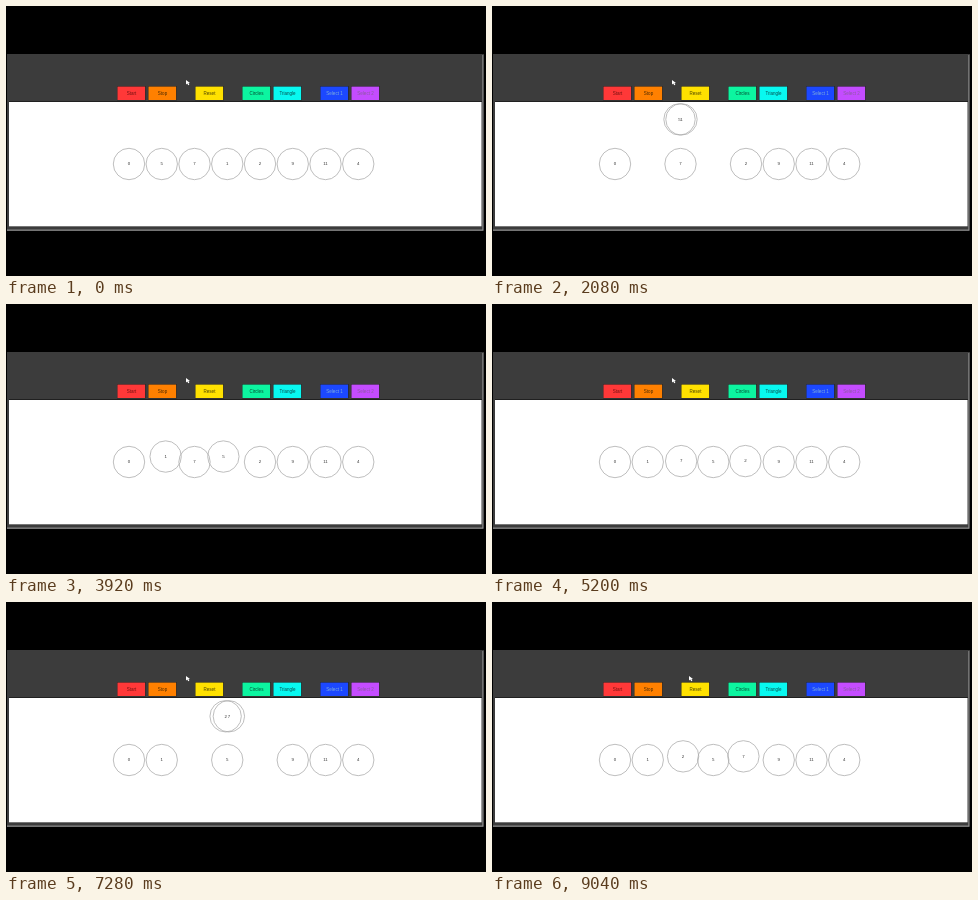
These frames come from a looping animation (480x270 px, 9120 ms). An HTML page with a canvas:

```html
<!DOCTYPE html>
<html lang="en">
<head>
<meta charset="utf-8">
<title>Selection sort</title>
<style>
  html, body { margin: 0; width: 100%; height: 100%; overflow: hidden; background: #000; }
  canvas { display: block; width: 480px; height: 270px; }
</style>
</head>
<body>
<canvas id="stage" width="480" height="270"></canvas>
<script>
const ctx = document.getElementById('stage').getContext('2d');

const LOOP = 9120, STEP = 80;
const LEG = 2020;              // time for one side of the triangle
const ROW = 158, APEX = 112, RADIUS = 15.7;
const values = [0, 5, 7, 1, 2, 9, 11, 4];
const swaps = [
  { a: 1, b: 3, start: 120, shown: 240 },
  { a: 2, b: 4, start: 5160, shown: 5200 }
];
const buttons = [
  [112, '#ff3838', 'Start', '#701010'],
  [143, '#ff8000', 'Stop', '#4a2800'],
  [190, '#ffe100', 'Reset', '#4a4200'],
  [237, '#0cf5a0', 'Circles', '#064830'],
  [268, '#08f8f0', 'Triangle', '#064c4c'],
  [315, '#1c48ff', 'Select 1', '#80b0d8'],
  [346, '#c44cff', 'Select 2', '#8c5aa0']
];

const slotX = i => 123 + i * 32.75;

function rect(x, y, w, h, color) {
  ctx.fillStyle = color;
  ctx.fillRect(x, y, w, h);
}

function label(text, x, y, color, size) {
  ctx.font = size + 'px "Liberation Sans", Arial, sans-serif';
  ctx.textAlign = 'center';
  ctx.textBaseline = 'middle';
  ctx.fillStyle = color;
  ctx.fillText(text, x, y);
}

function drawWindow() {
  rect(0, 0, 480, 270, '#000');
  rect(1, 48, 477, 177, '#3c3c3c');
  rect(3, 95, 473, 1, '#202020');
  rect(3, 96, 472.5, 124.3, '#fff');
  rect(476.3, 49, 1, 175, '#888');
  rect(1, 223.6, 476, 1, '#999');
  for (const [x, fill, text, ink] of buttons) {
    rect(x - 1, 80, 29, 14.5, '#2a2a2a');
    rect(x - 0.5, 80.6, 27.6, 13.4, fill);
    label(text, x + 13.5, 87.3, ink, 4.5);
  }
}

function drawNode(value, x, y) {
  ctx.beginPath();
  ctx.arc(x, y, RADIUS, 0, Math.PI * 2);
  ctx.strokeStyle = '#aeaeae';
  ctx.lineWidth = 0.8;
  ctx.stroke();
  label(value, x, y + 0.2, '#333', 4.4);
}

function drawNodes(t) {
  const order = values.slice();
  const pos = order.map((_, i) => ({ x: slotX(i), y: ROW }));
  for (const { a, b, start, shown } of swaps) {
    if (t < shown) continue;
    const p = (t - start) / (2 * LEG);
    if (p >= 1) {
      [order[a], order[b]] = [order[b], order[a]];
      continue;
    }
    const shift = (slotX(b) - slotX(a)) * p;
    const lift = (ROW - APEX) * (1 - Math.abs(2 * p - 1));
    pos[a] = { x: slotX(a) + shift, y: ROW - lift };
    pos[b] = { x: slotX(b) - shift, y: ROW - lift };
  }
  order.forEach((v, i) => drawNode(v, pos[i].x, pos[i].y));
}

function drawCursor(t) {
  const move = Math.min(1, Math.max(0, (t - 8880) / 160));
  ctx.save();
  ctx.translate(180 + 17 * move, 74);
  ctx.beginPath();
  ctx.moveTo(0, 0);
  ctx.lineTo(0, 4.5);
  ctx.lineTo(1.3, 3.6);
  ctx.lineTo(2.2, 5.3);
  ctx.lineTo(3.4, 4.8);
  ctx.lineTo(2.5, 3.2);
  ctx.lineTo(4, 3);
  ctx.closePath();
  ctx.fillStyle = '#fff';
  ctx.fill();
  ctx.restore();
}

function render(now) {
  const t = Math.floor((now % LOOP) / STEP) * STEP;
  drawWindow();
  drawNodes(t);
  drawCursor(t);
}

const begin = performance.now();
function tick() {
  render(performance.now() - begin);
  requestAnimationFrame(tick);
}
tick();
</script>
</body>
</html>
```
